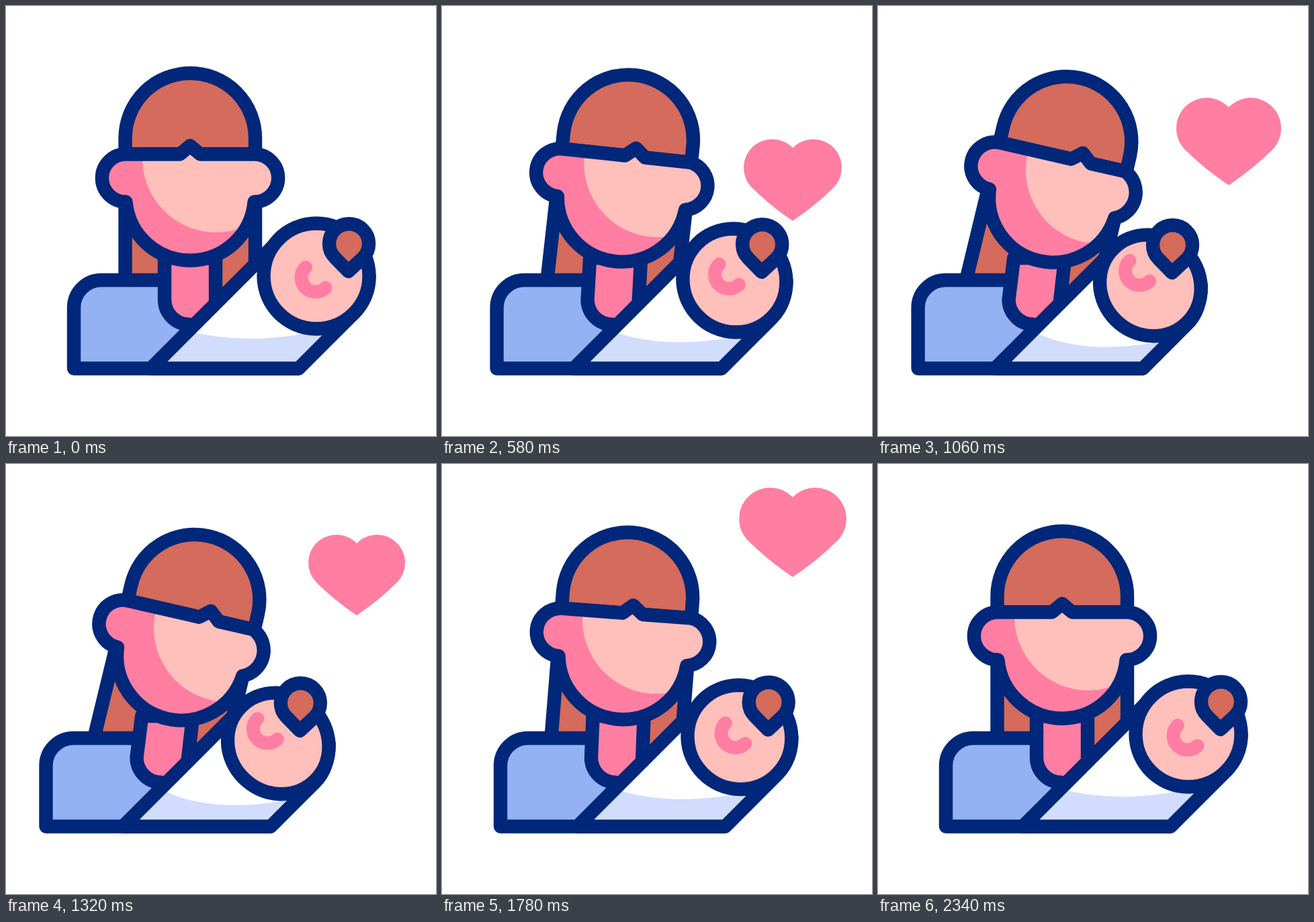
An HTML page for the animation above (2400 ms loop, 640x640 px).

```html
<!DOCTYPE html>
<html lang="en">
<head>
<meta charset="utf-8">
<title>Mother and baby</title>
<style>
  html, body { margin: 0; width: 100%; height: 100%; overflow: hidden; background: #fff; }
  svg { display: block; width: 100%; height: 100%; }
  .line { fill: none; stroke: #002779; stroke-width: 20.4; stroke-linejoin: round; stroke-linecap: round; }
  .hair { fill: #d46b5c; }
  .skin { fill: #ffbfba; }
  .pink { fill: #ff7ea2; }
  .dress { fill: #94b1f3; }
  .white { fill: #fff; }
  .shade { fill: #d2dcfc; }
  .nose { fill: none; stroke: #ff7ea2; stroke-width: 20; stroke-linecap: round; }
</style>
</head>
<body>
<svg viewBox="0 0 640 640">
  <defs><clipPath id="faceClip"><path id="faceEdge"/></clipPath></defs>

  <path id="heart" class="pink" d="M0 -28.5A47 47 0 0 0 -81 4A47 47 0 0 0 -67.2 37.2Q-38 66.4 0 92Q38 66.4 67.2 37.2A47 47 0 0 0 81 4A47 47 0 0 0 0 -28.5Z"/>

  <g id="backHair"><path class="line hair" d="M177.5 220H371V440H177.5Z"/></g>

  <g id="torso">
    <path class="dress" d="M101 539.5V449A41 41 0 0 1 142 408H236L312 443L215 540Z"/>
    <path class="line" d="M236 408H142A41 41 0 0 0 101 449V539.5H435"/>
    <path id="neck" class="line pink"/>
  </g>

  <g id="head">
    <path class="line hair" d="M177.5 220.5V196.8A96.75 96.75 0 0 1 371 196.8V220.5Z"/>
    <path id="face" class="pink"/>
    <g clip-path="url(#faceClip)"><circle id="glow" class="skin" cy="227" r="110"/></g>
    <path id="faceLine" class="line"/>
  </g>

  <g id="bundle">
    <path id="wrap" class="white"/>
    <path id="fold" class="shade"/>
    <path id="wrapLine" class="line"/>
    <ellipse id="babyHead" class="line skin"/>
    <path id="nose" class="nose" d="M446 389A21.2 21.2 0 0 0 475.5 419.5"/>
    <path id="tuft" class="line hair" d="M509.5 395L489.5 374.5A29.5 29.5 0 1 1 531.5 374.5Z"/>
  </g>
</svg>
<script>
const LOOP = 2400;
const el = id => document.getElementById(id);
const set = (id, attr, value) => el(id).setAttribute(attr, value);
const clamp = v => Math.min(1, Math.max(0, v));

// symmetric ease, like cubic-bezier(.75, 0, .25, 1)
function ease(x) {
  x = clamp(x);
  let lo = 0, hi = 1;
  for (let i = 0; i < 24; i++) {
    const s = (lo + hi) / 2, r = 1 - s;
    if (2.25 * s * r * r + 0.75 * s * s * r + s * s * s < x) lo = s; else hi = s;
  }
  return lo * lo * (3 - 2 * lo);
}

// time and half width at each turn of the heartbeat
const beats = [[370, 0], [505, 75], [850, 58], [1165, 85], [1450, 62], [1680, 85], [1900, 73], [2110, 0]];

function heartSize(t) {
  for (let i = 1; i < beats.length; i++) {
    const [t0, a] = beats[i - 1], [t1, b] = beats[i];
    if (t >= t0 && t < t1) {
      const u = (t - t0) / (t1 - t0);
      return a + (b - a) * u * u * (3 - 2 * u);
    }
  }
  return 0;
}

function drawHeart(t) {
  const d = t - 580;
  const y = 237 - 0.116 * d - 0.000014 * d * d;
  set('heart', 'transform', `translate(522 ${y}) scale(${heartSize(t) / 81})`);
}

function drawMother(p) {
  const turn = angle => `translate(${6.3 * p} ${5 * p}) rotate(${angle * p} 274 197)`;
  set('backHair', 'transform', turn(13.7));
  set('head', 'transform', turn(13));

  const part = 28 * p;
  const sag = 35.5 - 12.5 * p;
  const ear = (35.5 * 35.5 + sag * sag) / (2 * sag);
  const face = `M178.4 220.5H${259 + part}L${274 + part} 208L${289 + part} 220.5H369.6` +
    `A${ear} ${ear} 0 0 1 369.6 291.5A96 96 0 0 1 178.4 291.5A35.5 35.5 0 0 1 178.4 220.5Z`;
  for (const id of ['face', 'faceEdge', 'faceLine']) set(id, 'd', face);
  set('glow', 'cx', 313 + 19 * p);

  const lean = 7.7 * p;
  set('neck', 'd', `M${236 + lean} 375L236 437A37 37 0 0 0 273 474L280 475L312 443L${312 + lean} 375Z`);
}

function drawBaby(p) {
  const cx = 462 - 15.3 * p, cy = 402 + 14 * p;
  const long = 78.5 - p, short = 78.5 - 5.5 * p;
  const k = long * Math.SQRT1_2, left = cx - k, low = cx + k;
  const right = cx + Math.hypot(long, short) * Math.SQRT1_2;
  const wrap = `M435.5 539.5H215.5L${left} ${755 - left}L${right} ${cy}` +
    `Q${right} ${975 - right} ${low} ${975 - low}Z`;
  set('wrap', 'd', wrap);
  set('wrapLine', 'd', wrap);
  set('fold', 'd', `M272 484Q${372 - 27 * p} ${509 + 13 * p} ${485 - 18 * p} ${478 + 21 * p}L435.5 539.5H215.5Z`);
  set('babyHead', 'transform', `translate(${cx} ${cy}) rotate(45)`);
  set('babyHead', 'rx', long);
  set('babyHead', 'ry', short);
  set('nose', 'transform', `translate(${-30.3 * p} ${-10 * p})`);
  set('tuft', 'transform', `translate(${-30.8 * p} ${2 * p})`);
}

function draw(t) {
  const p = t < 1220 ? ease(t / 1180) : 1 - ease((t - 1240) / 990);
  const slide = `translate(${-41.7 * p} 0)`;
  set('torso', 'transform', slide);
  set('bundle', 'transform', slide);
  drawHeart(t);
  drawMother(p);
  drawBaby(p);
}

let start;
function tick(now) {
  if (start === undefined) start = now;
  draw((now - start) % LOOP);
  requestAnimationFrame(tick);
}
draw(0);
requestAnimationFrame(tick);
</script>
</body>
</html>
```
